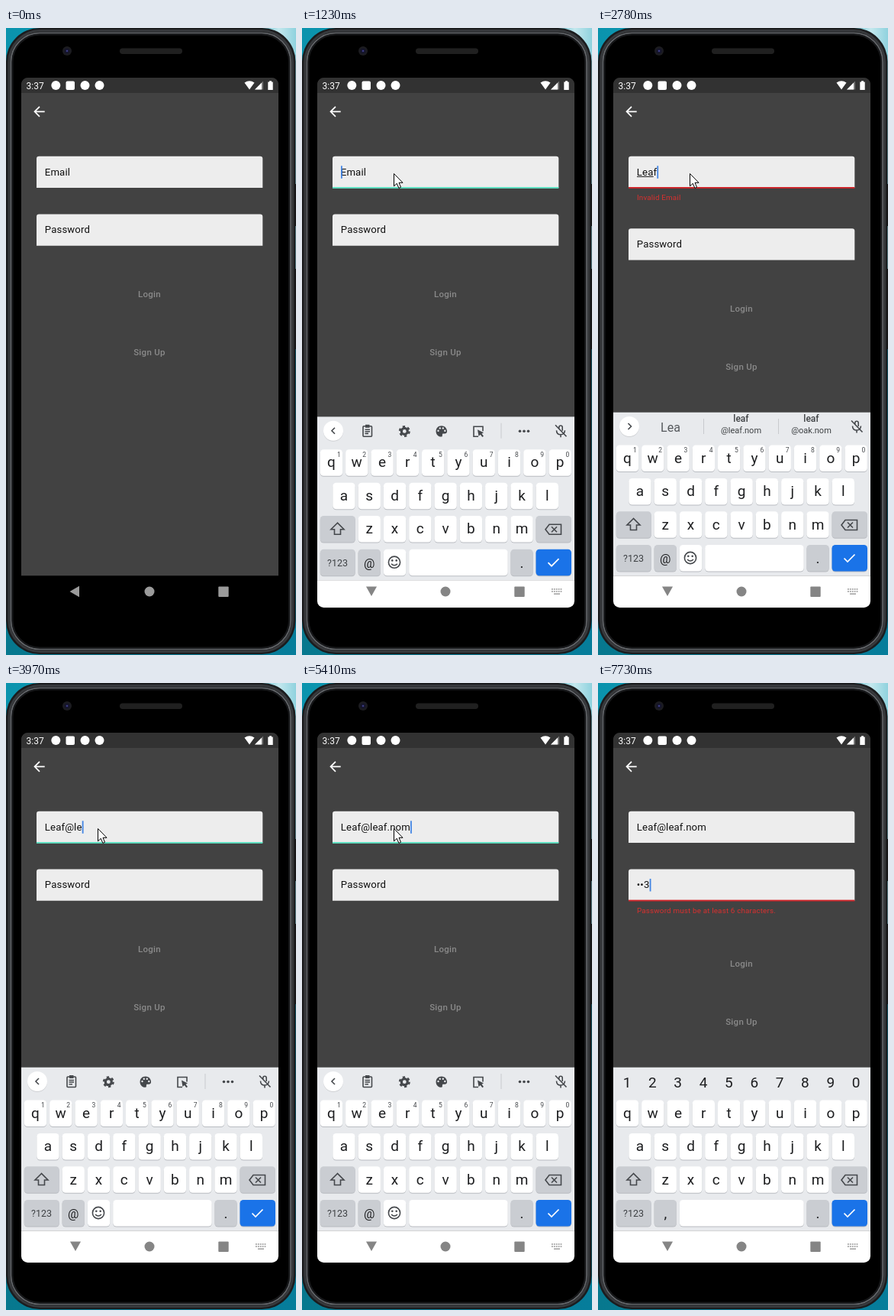
Write an HTML page that moves like this. It is 380 px wide and 820 px high and loops after 8 s.

```html
<!DOCTYPE html>
<html lang="en">
<head>
<meta charset="utf-8">
<title>Login form</title>
<style>
  html, body { margin: 0; width: 100%; height: 100%; overflow: hidden; background: #0b7189; }
  svg { display: block; }
  text { font-family: Roboto, sans-serif; white-space: pre; }
  .mid { text-anchor: middle; }
  .input { font-size: 13.2px; letter-spacing: .12px; fill: #111; }
  .error { font-size: 9.84px; letter-spacing: .17px; fill: #d9302f; }
  .button { font-size: 11.5px; font-weight: 500; letter-spacing: .3px; fill: #8a8a8a; text-anchor: middle; }
  .letter { font-size: 19px; fill: #1d1e20; text-anchor: middle; }
  .hint { font-size: 8.5px; fill: #44474b; text-anchor: middle; }
  .line { fill: none; stroke: #45484c; stroke-width: 1.6; }
  .dark { fill: #45484c; }
</style>
</head>
<body>
<svg width="380" height="820" viewBox="0 0 380 820">
  <defs>
    <linearGradient id="sea" x2="1" y2="0">
      <stop offset="0" stop-color="#0a93ad"/><stop offset=".85" stop-color="#2aa3ba"/>
      <stop offset=".94" stop-color="#c4e8ee"/><stop offset="1" stop-color="#8fd2de"/>
    </linearGradient>
    <linearGradient id="deep" x2="1" y2="0">
      <stop offset="0" stop-color="#07788e"/><stop offset="1" stop-color="#067d9b"/>
    </linearGradient>
    <clipPath id="screen"><rect x="20" y="65.300" width="337" height="692.700" rx="8.500"/></clipPath>
  </defs>

  <rect width="380" height="410" fill="url(#sea)"/>
  <rect y="410" width="380" height="410" fill="url(#deep)"/>
  <g id="phone">
    <rect x="378" y="204" width="2" height="55" fill="#111"/>
    <rect x="378" y="315" width="2" height="105" fill="#111"/>
    <rect x="0" y="0" width="379.500" height="819" rx="44" fill="#1b1c1e"/>
    <rect x="4" y="3.500" width="371.500" height="812" rx="41" fill="none" stroke="#37393c" stroke-width="3"/>
    <rect x="6.500" y="6.500" width="366.500" height="806" rx="38" fill="none" stroke="#66696d" stroke-width="1.600"/>
    <rect x="8.500" y="8.500" width="362.500" height="802" rx="36" fill="#000" stroke="#17181a" stroke-width="2"/>
    <circle cx="80" cy="30" r="6" fill="#1c1c20"/>
    <circle cx="80" cy="30" r="3.6" fill="#15152a"/>
    <circle cx="80" cy="30" r="1.3" fill="#3d3d86"/>
    <rect x="149" y="26.500" width="82" height="7.500" rx="3.700" fill="#202020"/>
  </g>

  <g clip-path="url(#screen)">
    <rect x="20" y="65" width="337" height="651.500" fill="#424242"/>
    <rect x="20" y="65" width="337" height="20" fill="#323232"/>
    <g fill="#fff">
      <text x="26.500" y="79.500" font-size="12">3:37</text>
      <circle cx="65.300" cy="75" r="6"/>
      <rect x="78.500" y="69.500" width="11.500" height="11.500" rx="2"/>
      <circle cx="103.500" cy="75" r="6"/>
      <circle cx="122.500" cy="75" r="6"/>
      <path d="M312.500 71.500q6.500 -4.500 13 0l-6.500 9z"/>
      <path d="M337 69.500v11h-11z" fill="#777"/>
      <path d="M335 71.500v9h-9z"/>
      <path d="M343.300 70.500h1.700v-1.200h3v1.200h1.700v10.500h-6.400z"/>
    </g>
    <path d="M50.700 109.300H38.500M44 102.800l-6.500 6.500 6.500 6.500" fill="none" stroke="#fff" stroke-width="1.700"/>

    <path d="M40 209v-38q0-3.300 3.300-3.300h289.700q3.300 0 3.300 3.300v38z" fill="#ededed"/>
    <rect id="emailLine" x="40" y="208" width="296.300" height="1.900"/>
    <text id="email" class="input" x="50.800" y="192.800"></text>
    <rect id="composing" x="51" y="194" height="1" fill="#222"/>
    <text id="emailError" class="error" x="51" y="225">Invalid Email</text>

    <g id="passwordBox">
      <path d="M40 284.800v-38q0-3.300 3.300-3.300h289.700q3.300 0 3.300 3.300v38z" fill="#ededed"/>
      <rect id="passwordLine" x="40" y="283.600" width="296.300" height="1.900"/>
      <text id="password" class="input" x="50.800" y="268.400"></text>
      <text id="passwordError" class="error" x="51" y="300.700">Password must be at least 6 characters.</text>
    </g>
    <rect id="caret" width="1.800" height="16.500" fill="#4285e4"/>
    <g id="buttons">
      <text class="button" x="188" y="352.300">Login</text>
      <text class="button" x="188" y="427.800">Sign Up</text>
    </g>

    <rect x="20" y="716.500" width="337" height="42" fill="#000"/>
    <g id="keyboard"></g>
    <g id="nav">
      <path id="back"/>
      <circle cx="188" cy="737" r="6.500"/>
      <rect x="278.300" y="730.500" width="13.400" height="13.400" rx="1"/>
      <g id="switcher" opacity=".75"></g>
    </g>
  </g>
  <path id="pointer" d="M0 0V16.300L3.800 12.800L6.400 18.900L9 17.700L6.500 11.800H11.500Z" fill="#fff" stroke="#000"/>
</svg>
<script>
const LOOP = 8000, EMAIL = 'Leaf@leaf.nom', FOCUS_EMAIL = 800, FOCUS_PASSWORD = 6700;
const emailKeys = [2190, 2310, 2540, 2780, 3270, 3510, 3970, 4210, 4590, 4710, 4950, 5190, 5410];
const passwordKeys = [[0, ''], [7160, '1'], [7390, '•2'], [7730, '••3']];
const emailErrors = [[2190, 3510], [4710, 4950]];
const composed = [[0, 0], [2190, 1], [2310, 2], [2780, 3], [3020, 4], [3510, 0]];
const strips = [[0, 'tools'], [2190, 'short'], [2780, 'almost'], [3020, 'full'],
                [3510, 'tools'], [6810, 'digits']];
const slide = [[0, 260], [1110, 89], [1230, 5.7], [1350, 0]];
const pointerPath = [[0, -50, 0], [220, 78, 220], [330, 95, 207], [450, 112, 196], [560, 120.5, 190.5],
  [6250, 122, 208], [6360, 126, 232], [6470, 130, 252], [6590, 133, 259],
  [7160, 235, 290], [7280, 352, 318], [7390, 420, 330]];

const el = id => document.getElementById(id);
const at = (steps, t) => steps.filter(s => s[0] <= t).pop();
const show = (node, on) => { node.style.display = on ? '' : 'none'; };
const move = (node, x, y) => node.setAttribute('transform', `translate(${x} ${y})`);
const label = (cls, x, y, s, extra = '') => `<text class="${cls}" x="${x}" y="${y}" ${extra}>${s}</text>`;

function key(x, y, w, fill = '#fff') {
  const r = (dy, c) => `<rect x="${x}" y="${y + dy}" width="${w}" height="34.500" rx="4.500" fill="${c}"/>`;
  return r(1, '#b9bcc1') + r(0, fill);
}

function letters(row, x, y) {
  return [...row].map((c, i) => key(x + i * 33.3, y, 29.3) +
    label('letter', x + 14.6 + i * 33.3, y + 23.3, c)).join('');
}

function suggestions(first, second, third, domains) {
  const [a, b] = domains || [];
  const part = (x, word, domain) => domain
    ? label('mid', x, 515, word, 'font-size="12" font-weight="500" fill="#3d4043"') +
      label('mid', x, 530, domain, 'font-size="11" fill="#3d4043"')
    : label('mid', x, 527.5, word, 'font-size="16" fill="#55585c"');
  return '<path d="M138.500 511v20M236.500 511v20" stroke="#c8cace"/>' +
    part(95, first) + part(187.5, second, a) + part(279.5, third, b);
}

function chevron(d) {
  return `<circle cx="41" cy="522" r="13" fill="#cfd1d4"/><circle cx="41" cy="521" r="13" fill="#fff"/>
    <path class="line" d="${d}"/>`;
}

const mic = `<g class="line"><path d="M336.800 519v-2.500a2.200 2.200 0 0 1 4.400 0v4.500M333.500 520.500q0 5.500 5.500 5.500q5 0 5.500-5.500M339 526v3.500M332 513.500l14.500 15"/></g>`;

const tools = chevron('M43 517l-4 4 4 4') + `
  <g class="line">
    <rect x="80" y="515" width="11.500" height="13.500" rx="1"/><path d="M82.500 519.500h6.500M82.500 522h6.500M82.500 524.700h4.500"/>
    <circle cx="134.300" cy="521.700" r="4" stroke-width="3.200"/>
    <circle cx="134.300" cy="521.700" r="6.300" stroke-width="2.400" stroke-dasharray="3.300"/>
    <path d="M231 528.500h-6v-13h12v6"/>
  </g>
  <path class="dark" d="M83 513h5.500v4h-5.500zM230 519.500l8 4-2.500 1.300 2.500 3.200-1.700 1.300-2.500-3.200-2.300 2z"/>
  <path class="dark" d="M183 514.500c-10 0-9.500 14.300-.5 14.300c2.500 0 .5-2.800 2-4h3q3-.5 2.500-4.300q-1.500-6-7-6z"/>
  <g fill="#e8eaed"><circle cx="178.500" cy="521" r="1.200"/><circle cx="180.800" cy="517.700" r="1.200"/>
    <circle cx="184.800" cy="517.700" r="1.200"/><circle cx="187.300" cy="521" r="1.200"/></g>
  <path d="M261 511v20" stroke="#c8cace"/>
  <g class="dark"><circle cx="285.500" cy="521.500" r="1.800"/><circle cx="291" cy="521.500" r="1.800"/><circle cx="296.500" cy="521.500" r="1.800"/></g>` + mic;

const forward = chevron('M39.500 517l4 4-4 4') + mic;
const domains = ['@leaf.nom', '@oak.nom'];
const digits = [...'1234567890'];
const stripParts = {
  tools,
  short: forward + suggestions('Le', 'Let', 'Leg'),
  almost: forward + suggestions('Lea', 'leaf', 'leaf', domains),
  full: forward + suggestions('Leaf', 'leaf', 'leaf', domains),
  digits: digits.map((d, i) => label('letter', 38 + i * 33.35, 529, d)).join('')
};

const GREY = '#cacdd2';
el('keyboard').innerHTML = `
  <rect x="20" y="502.700" width="337" height="214" fill="#e8eaed"/>
  <rect x="20" y="716.500" width="337" height="310" fill="#fff"/>` +
  Object.entries(stripParts).map(([id, body]) => `<g id="${id}">${body}</g>`).join('') +
  letters('qwertyuiop', 23.8, 545.5) + letters('asdfghjkl', 40.3, 589) + letters('zxcvbnm', 73.6, 632.3) +
  `<g id="hints">${digits.map((d, i) => label('hint', 48.3 + i * 33.3, 555, d)).join('')}</g>` +
  key(23.8, 632.3, 46, GREY) + key(306.5, 632.3, 46.5, GREY) +
  `<path class="line" d="M46.500 641.500l-8.500 8.500h4.500v6.500h8v-6.500h4.500z"/>
   <path class="line" d="M324 643.500h15.500v13h-15.500l-5-6.500zM327 646.500l7 7M334 646.500l-7 7"/>` +
  key(23.8, 676, 46, GREY) + label('mid', 46.5, 698, '?123', 'font-size="12.500" fill="#3d4043"') +
  key(73.6, 676, 29.3, GREY) + key(273.4, 676, 29.3, GREY) + label('letter', 288, 700, '.') +
  `<g id="emailRow">${label('mid', 88.3, 700, '@', 'font-size="16" fill="#1d1e20"')}
     ${key(106.9, 676, 29.3)}${key(140.2, 676, 129.5)}
     <g class="line"><circle cx="121" cy="693" r="7.600"/><path d="M117 695q4 4 8 0"/></g>
     <g class="dark"><circle cx="118.300" cy="690.700" r="1.300"/><circle cx="123.700" cy="690.700" r="1.300"/></g></g>
   <g id="passwordRow">${label('letter', 88.3, 700, ',')}${key(106.9, 676, 162.8)}</g>` +
  key(306.5, 676, 46.5, '#1a73e8') +
  '<path d="M322.500 693.500l4.500 4.500 9.500-9.500" fill="none" stroke="#fff" stroke-width="1.700"/>';

el('switcher').innerHTML = [0, 1].map(r => [0, 1, 2, 3, 4].map(c =>
  `<rect x="${327 + c * 2.9}" y="${733 + r * 3}" width="1.800" height="1.800"/>`).join('')).join('') +
  '<rect x="330" y="739.300" width="8" height="1.600"/>';

const clamp = v => Math.max(0, Math.min(1, v));
const FADE = 170;
// An error keeps its room in the layout until it has faded out.
function errorState(spans, t) {
  const span = spans.find(([a, b]) => t >= a && t < b + FADE);
  if (!span) return { open: false, active: false, alpha: 0 };
  const [a, b] = span;
  return { open: true, active: t < b, alpha: t < b ? clamp((t - a + 40) / FADE) : 1 - clamp((t - b) / FADE) };
}

function drawField(id, hint, value, focused, error) {
  el(id).textContent = value || hint;
  const line = el(id + 'Line');
  show(line, focused || error.active);
  line.setAttribute('fill', error.active ? '#d0252a' : '#5fe3c4');
  el(id + 'Error').style.opacity = error.alpha;
}

function render(t) {
  const typed = emailKeys.filter(k => k <= t).length;
  const email = EMAIL.slice(0, typed);
  const [passwordTime, password] = at(passwordKeys, t);
  const onPassword = t >= FOCUS_PASSWORD;
  const onEmail = t >= FOCUS_EMAIL && !onPassword;
  const emailError = errorState(emailErrors, t);
  const passwordError = errorState([[7160, 9000]], t);
  drawField('email', 'Email', email, onEmail, emailError);
  drawField('password', 'Password', password, onPassword, passwordError);

  move(el('passwordBox'), 0, emailError.open ? 18.8 : 0);
  move(el('buttons'), 0, emailError.open || passwordError.open ? 18.8 : 0);

  const count = at(composed, t)[1];
  el('composing').setAttribute('width', count ? el('email').getSubStringLength(0, count) : 0);

  const active = el(onPassword ? 'password' : 'email');
  const value = onPassword ? password : email;
  const lastKey = onPassword ? Math.max(FOCUS_PASSWORD, passwordTime)
                             : Math.max(FOCUS_EMAIL, emailKeys[typed - 1] || 0);
  const phase = (t - lastKey) % 1030;
  const caret = el('caret');
  show(caret, (onEmail || onPassword) && phase < (typed && !onPassword ? 590 : 550));
  caret.setAttribute('x', 51 + (value ? active.getComputedTextLength() : 0));
  caret.setAttribute('y', onPassword ? 256 : 180.3);

  const open = t >= 1110;
  show(el('keyboard'), open);
  move(el('keyboard'), 0, at(slide, t)[1]);
  const strip = at(strips, t)[1];
  for (const id in stripParts) show(el(id), id === strip);
  show(el('hints'), strip !== 'digits');
  show(el('emailRow'), strip !== 'digits');
  show(el('passwordRow'), strip === 'digits');

  el('nav').setAttribute('fill', open ? '#858585' : t >= 1010 ? '#8d8d8d' : '#9b9b9b');
  el('back').setAttribute('d', open ? 'M84 730.500h14l-7 12.500z' : 'M83.500 737l12.500-7.200v14.400z');
  show(el('switcher'), t >= 1010);

  const [, x, y] = at(pointerPath, t);
  move(el('pointer'), x, y);
}

const start = performance.now();
function tick() {
  render((performance.now() - start) % LOOP);
  requestAnimationFrame(tick);
}
tick();
</script>
</body>
</html>
```
